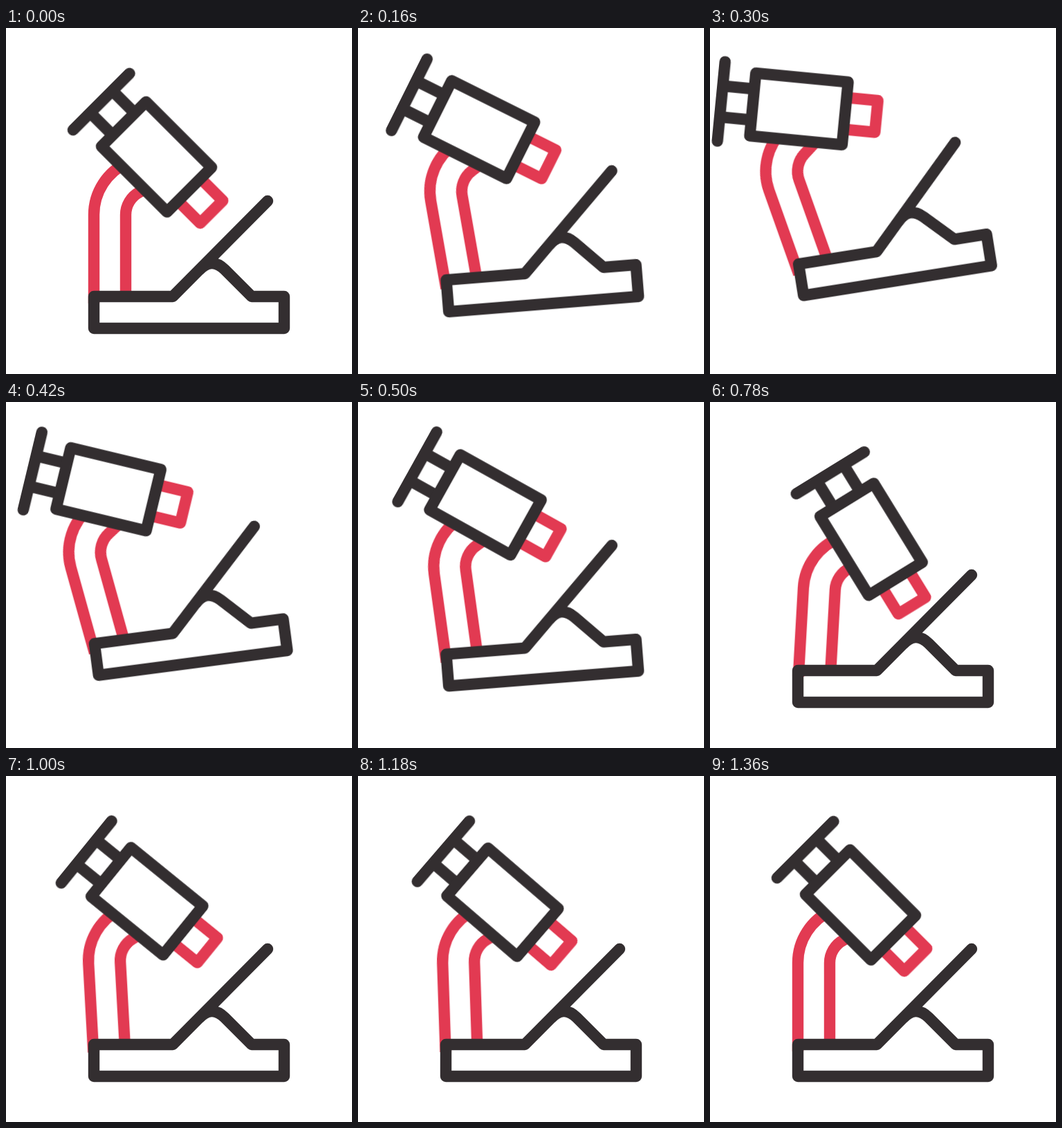
These frames come from a looping animation (500 by 500 pixels, 1400 ms). An HTML page:

```html
<!DOCTYPE html>
<html lang="en">
<head>
<meta charset="utf-8">
<title>Microscope</title>
<style>
  html, body { margin: 0; width: 100%; height: 100%; overflow: hidden; background: #fff; }
  svg { display: block; width: 100%; height: 100%; }
  path { fill: none; stroke-width: 16.4; stroke-linejoin: round; }
  .dark { stroke: #332e30; stroke-linecap: round; }
  .red { stroke: #e23a52; }
  .barrel { fill: #fff; }

  .body, .arm, .head {
    animation: 1400ms cubic-bezier(.37, 0, .63, 1) infinite;
  }
  .body { transform-origin: 127px 388px; animation-name: hop; }
  .arm { transform-origin: 150px 411px; animation-name: sway; }
  .head { transform-origin: 175px 209px; animation-name: nod; }

  @keyframes hop {
    0%, 48.571%, 100% { transform: translate(0, 0) rotate(0deg); }
    22.857% { transform: translate(1px, -47.3px) rotate(-9.1deg); }
  }
  @keyframes sway {
    0%, 97.857%, 100% { transform: rotate(0deg); }
    22.857% { transform: rotate(-10.65deg); }
    49.286% { transform: rotate(4.5deg); }
    73.571% { transform: rotate(-3.3deg); }
  }
  @keyframes nod {
    0%, 2.143%, 97.857%, 100% { transform: rotate(0deg); }
    22.857% { transform: rotate(-20.1deg); }
    52.857% { transform: rotate(10.8deg); }
    75% { transform: rotate(-3.6deg); }
  }
</style>
</head>
<body>
<svg viewBox="0 0 500 500">
  <g class="body">
    <g class="arm">
      <path class="red" d="M127 398V270A83 83 0 0 1 176 194.2"/>
      <path class="red" d="M173 394V270A37 37 0 0 1 193 237.1L213 226.8"/>
      <g class="head">
        <g transform="translate(217.5 186.3) rotate(45)">
          <path class="red" d="M67 -23H112.4V23H67"/>
          <path class="dark" d="M-112.8 -57.6V57.6M-112.8 -22.5H-67M-112.8 22.5H-67"/>
          <path class="dark barrel" d="M-67 -45.5H67V45.5H-67Z"/>
        </g>
      </g>
    </g>
    <path class="dark" d="M378 250L241 388H127V434H402V388H355L316 349Q297 330.5 279 350"/>
  </g>
</svg>
</body>
</html>
```
